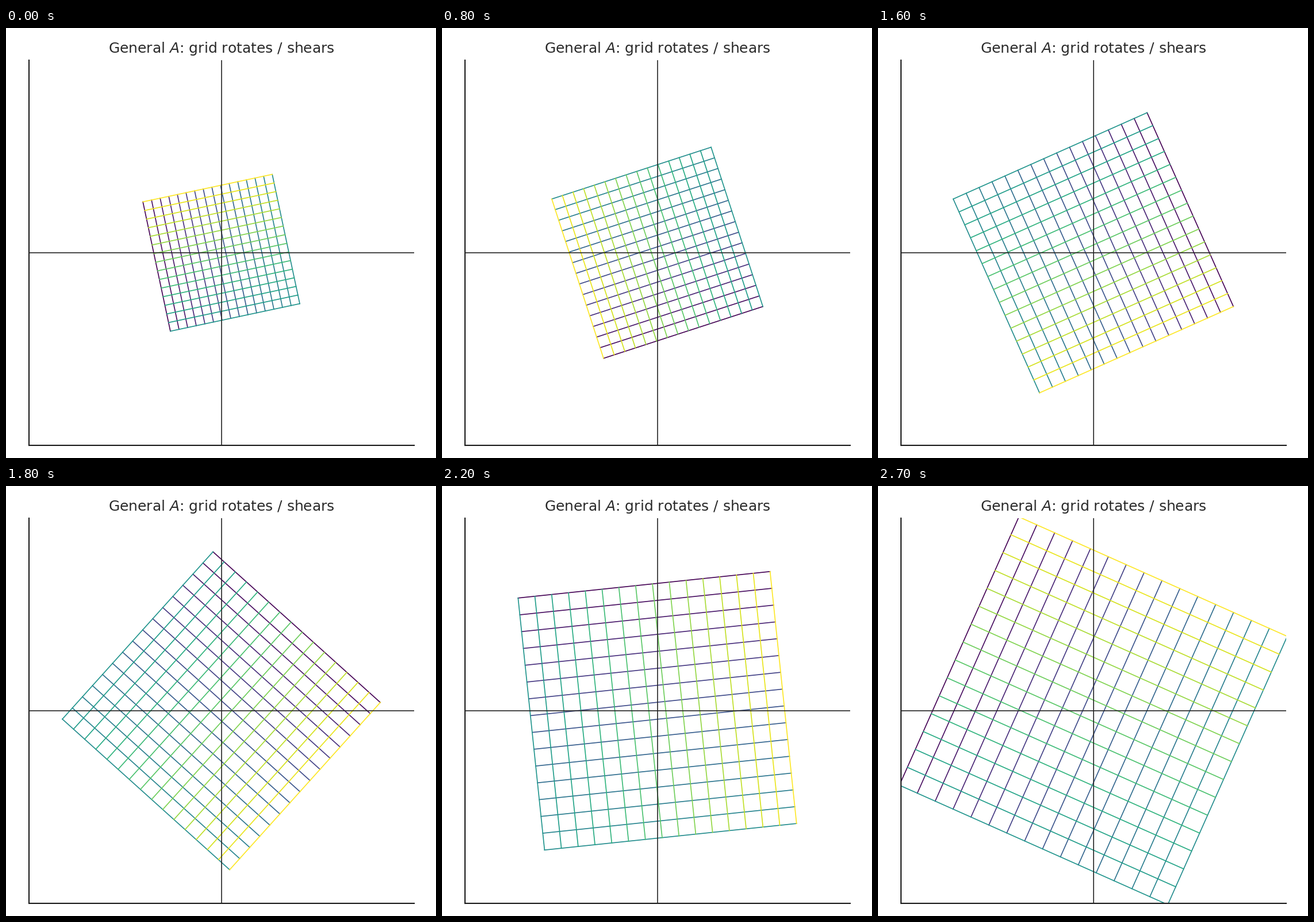
A matplotlib script for the animation above (2800 ms loop, 748 px wide and 748 px high).

```python
import numpy as np
import matplotlib.pyplot as plt
from matplotlib.animation import FuncAnimation

SIZE, DPI = 748, 150
FRAMES, INTERVAL = 28, 100
LINES = 16
ANGLE = np.radians(12)
GROWTH = 1.03

plt.rcParams["font.family"] = "DejaVu Sans"

fig = plt.figure(figsize=(SIZE / DPI, SIZE / DPI), dpi=DPI, facecolor="white")
ax = fig.add_axes([39.55 / SIZE, 22 / SIZE, 670 / SIZE, 670 / SIZE])
ax.set(xlim=(-3, 3), ylim=(-3, 3), xticks=[], yticks=[])
ax.set_title("General $A$: grid rotates / shears", fontsize=12, color="#2a2a2a")
ax.spines[["top", "right"]].set_visible(False)
for side in ("left", "bottom"):
    ax.spines[side].set(linewidth=1.0, color="#1a1a1a")

# Each segment is a 2x2 array: x values, then y values of its two ends.
ticks = np.linspace(-1, 1, LINES)
ends = np.array([-1.0, 1.0])
segments = [np.array([[t, t], ends]) for t in ticks]
segments += [np.array([ends, [t, t]]) for t in ticks]

colors = plt.cm.viridis(np.linspace(0, 1, len(segments)))
grid = [ax.plot([], [], color=c, lw=0.8)[0] for c in colors]
ax.axhline(0, color="#262626", lw=0.8, zorder=3)
ax.axvline(0, color="#262626", lw=0.8, zorder=3)


def power(k):
    """k-th power of the rotate-and-scale matrix."""
    c, s = np.cos(k * ANGLE), np.sin(k * ANGLE)
    return GROWTH ** k * np.array([[c, -s], [s, c]])


def update(i):
    matrix = power(i + 1)
    for line, segment in zip(grid, segments):
        line.set_data(*(matrix @ segment))
    return grid


anim = FuncAnimation(fig, update, frames=FRAMES, interval=INTERVAL,
                     init_func=lambda: update(0), repeat=True, repeat_delay=0)
plt.show()
```
